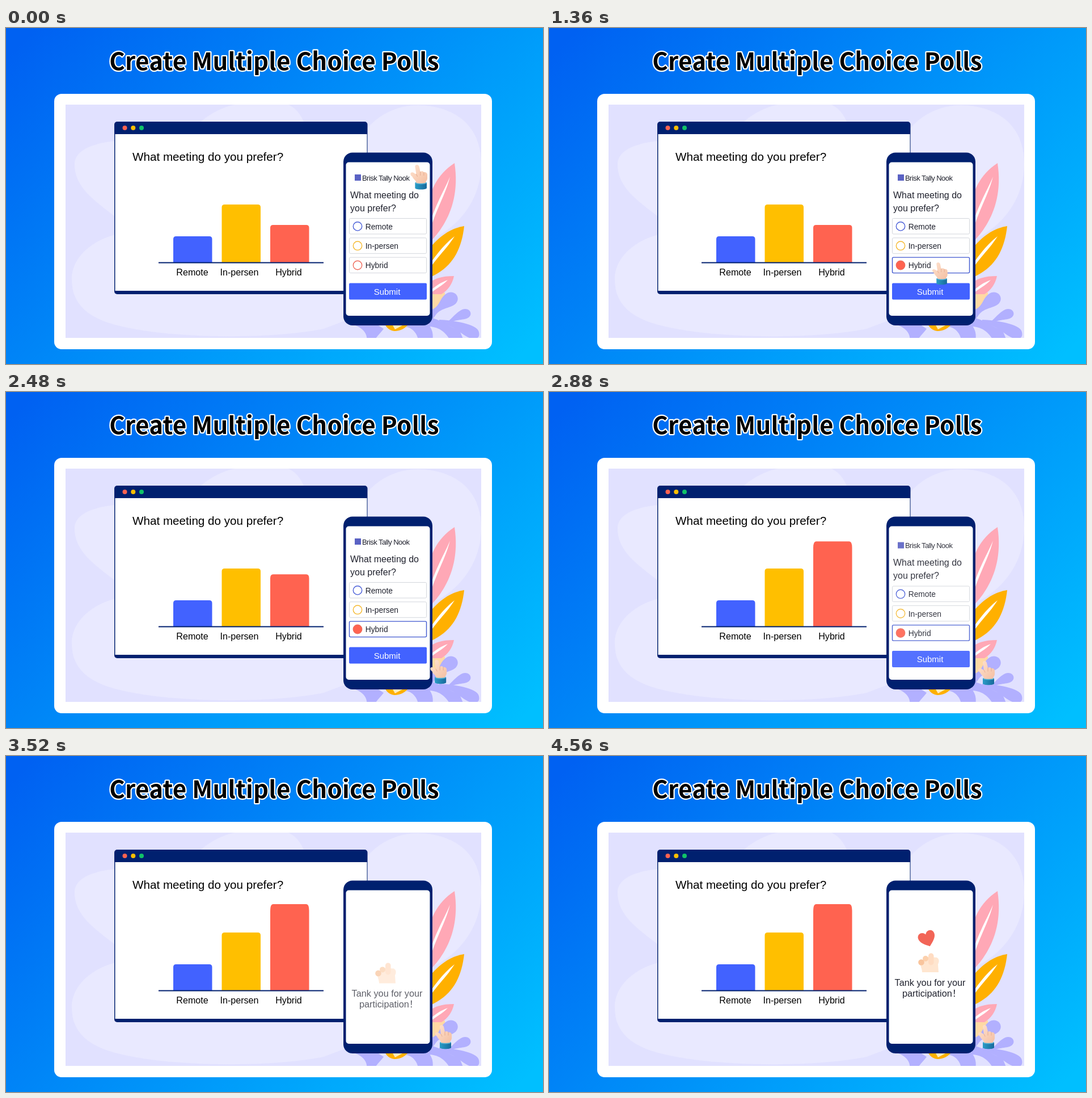
An HTML page that plays this animation: 947x592 px, repeating every 4600 ms.

```html
<!DOCTYPE html>
<html lang="en">
<head>
<meta charset="utf-8">
<title>Multiple choice polls</title>
<style>
  html, body { margin: 0; width: 100%; height: 100%; overflow: hidden; }
  svg { display: block; width: 947px; height: 592px; }
  text { font-family: "Liberation Sans", Arial, sans-serif; }
  .title {
    font: 700 42px "Noto Sans CJK SC", "Noto Sans CJK JP", "Noto Sans", sans-serif;
    letter-spacing: .3px; text-anchor: middle;
    paint-order: stroke; stroke: #fff; stroke-width: 4.5; stroke-linejoin: round;
  }
  .mid { text-anchor: middle; }
  .label { font-size: 16.1px; text-anchor: middle; }
  .phone-text { font-size: 16px; fill: #20222e; }
  .thanks { font-size: 16.3px; fill: #20222e; }
  .option { font-size: 13.8px; fill: #20222e; }
  .vein { fill: #fff; }
</style>
</head>
<body>
<svg viewBox="0 0 947 592">
  <defs>
    <linearGradient id="sky" gradientUnits="userSpaceOnUse" x1="110" y1="-60" x2="837" y2="652">
      <stop offset="0" stop-color="#0061f2"/>
      <stop offset="1" stop-color="#00bfff"/>
    </linearGradient>
    <linearGradient id="skin" x1="0" y1="0" x2="1" y2="1">
      <stop offset="0" stop-color="#ffe3d0"/>
      <stop offset="1" stop-color="#f4bfa2"/>
    </linearGradient>
    <linearGradient id="cuff" x1="0" y1="0" x2="1" y2="0">
      <stop offset="0" stop-color="#2a9cc6"/>
      <stop offset="1" stop-color="#17699b"/>
    </linearGradient>
    <clipPath id="panel"><rect x="105" y="135" width="733" height="411"/></clipPath>
  </defs>

  <rect width="947" height="592" fill="url(#sky)"/>
  <text class="title" x="473" y="74">Create Multiple Choice Polls</text>
  <rect x="85" y="116" width="772" height="450" rx="13" fill="#fff"/>

  <g clip-path="url(#panel)">
    <rect x="105" y="135" width="733" height="411" fill="#e1e1ff"/>
    <g fill="#e9e9ff">
      <path d="M230 197C180 197 121 206 121 241C121 285 165 310 205 342H300V197Z"/>
      <path d="M215 360C160 366 116 400 116 443C116 490 150 514 205 526C290 546 460 550 560 530L640 500V360Z"/>
      <path d="M338 170C360 150 385 135 425 132H490C510 138 520 152 527 170Z"/>
      <path d="M615 215C632 165 680 135 728 136C790 138 838 170 838 240C838 300 800 352 745 374H640Z"/>
    </g>

    <path d="M791 238C766 254 748 280 744 315V381C776 350 801 304 791 238Z" fill="#ffa8b6"/>
    <path class="vein" d="M783 262C774 284 759 308 748 342L751 346C761 316 776 290 783 262Z"/>
    <path d="M808 349C784 353 764 366 744 392V441C785 424 803 394 808 349Z" fill="#ffb000"/>
    <path class="vein" d="M791 367C774 380 760 398 748 415L750 420C762 402 778 388 791 367Z"/>
    <path d="M744 470L774 466C775 480 769 491 744 500Z" fill="#ffd9a4"/>
    <path d="M790 437C771 437 757 440 744 451V469H768C779 462 787 452 790 437Z" fill="#ffa8b6"/>
    <path class="vein" d="M779 444C767 448 757 455 748 463L750 466C760 458 771 453 779 444Z"/>

    <g fill="#b2b0ff">
      <path d="M775 469C787 460 800 470 796 481C791 494 770 491 759 504L748 519V497C765 493 764 477 775 469Z"/>
      <path d="M801 498C810 491 822 497 819 506C814 517 796 511 782 520L771 524C785 514 791 504 801 498Z"/>
      <path d="M764 514C787 515 832 521 834 536C836 546 831 548 820 547C804 542 792 524 764 520Z"/>
      <path d="M745 510C765 512 778 525 800 533L807 550H783C775 535 762 526 745 526Z"/>
      <path d="M704 522H744C752 530 754 540 752 550H727C725 537 716 528 704 526Z"/>
      <path d="M616 521H652L666 530C660 538 654 543 650 550H636C638 540 630 529 616 524Z"/>
    </g>
    <path d="M667 520H712C704 529 696 534 685 534C676 533 671 528 667 520Z" fill="#ffb000"/>
    <path class="vein" d="M681 522L703 522L686 531Z" opacity=".75"/>
  </g>

  <rect x="191" y="165" width="446.500" height="304" rx="5" fill="#00206f"/>
  <rect x="192.500" y="187" width="444" height="276" fill="#fff"/>
  <circle cx="209.500" cy="176" r="4" fill="#ff6350"/>
  <circle cx="224.300" cy="176" r="4" fill="#ffbf00"/>
  <circle cx="239" cy="176" r="4" fill="#10c268"/>
  <text x="223" y="234" font-size="20.650">What meeting do you prefer?</text>
  <g id="chart"></g>
  <path d="M269 413.500H560" stroke="#00206f" stroke-width="1.800"/>

  <rect x="595" y="219.500" width="157" height="304.500" rx="16" fill="#00206f"/>
  <rect x="599.500" y="236.500" width="148" height="270.500" rx="5" fill="#fff"/>

  <g id="form">
    <rect x="615" y="258" width="11" height="11" fill="#5a62c4"/>
    <text x="628" y="268.500" font-size="13" letter-spacing="-.55" fill="#20222e">Brisk Tally Nook</text>
    <text class="phone-text" x="607" y="299.700">What meeting do</text>
    <text class="phone-text" x="607" y="322.500">you prefer?</text>
    <g id="options"></g>
    <rect x="605" y="449.500" width="137" height="29" rx="2" fill="#4262ff"/>
    <text class="mid" x="672" y="469.500" font-size="15" fill="#fff">Submit</text>
  </g>

  <g id="thanks">
    <path d="M658 381C658 374 654 370 655 362L668 354L684 355C689 358 688 363 686 367L687 381Z" fill="#ffe6d0"/>
    <rect id="finger" x="669" width="9.500" height="21" rx="4.700" fill="#ffdcc2"/>
    <circle cx="664" cy="357" r="5" fill="#fcd0ac"/>
    <circle cx="656.500" cy="363.500" r="5.300" fill="#f9c49c"/>
    <text class="thanks mid" x="672" y="405">Tank you for your</text>
    <text class="thanks" x="623" y="424" font-size="16">participation<tspan lang="zh-CN" font-family="'Noto Sans CJK SC', sans-serif">！</tspan></text>
  </g>
  <path id="heart" d="M0 14C-8 8 -15 2 -15 -5C-15 -14 -4 -16 0 -8C4 -16 15 -14 15 -5C15 2 8 8 0 14Z" fill="#f26557"/>

  <g id="hand">
    <path d="M-4 31V40C-2 43 14 43 16 40V31Z" fill="url(#cuff)"/>
    <ellipse cx="6" cy="31" rx="10" ry="2.500" fill="#4fb0d4"/>
    <path d="M-4 3C-4 -1 2 -1 3 3L5 12C8 10 10 11 11 13C14 12 17 14 17 17V23C17 27 14 28 14 31C10 32 1 32 -2 31C-2 27 -7 25 -9 20C-12 18 -13 14 -10 13C-7 12 -4 16 -2 16Z" fill="url(#skin)"/>
    <path d="M5 12V18M11 13V18M-2 16L0 20" fill="none" stroke="#e3a487" stroke-width=".8" stroke-linecap="round"/>
  </g>
</svg>
<script>
const LOOP = 4600, STEP = 40;
const $ = id => document.getElementById(id);

function add(parent, tag, attrs, text) {
  const el = document.createElementNS('http://www.w3.org/2000/svg', tag);
  for (const k in attrs) el.setAttribute(k, attrs[k]);
  if (text) el.textContent = text;
  parent.append(el);
  return el;
}

// name, colour, bar left, bar top, label centre
const choices = [
  ['Remote', '#4262ff', 295, 367, 328.5],
  ['In-persen', '#ffbf00', 380.5, 311, 411.5],
  ['Hybrid', '#ff6350', 466, 347, 498.5]
];
const ringColors = ['#4a5fd8', '#f5b82e', '#ef6b5c'];

const rows = choices.map(([name, color, x, top, mid], i) => {
  const bar = add($('chart'), 'path', {
    d: `M${x} 413V${top + 5}q0 -5 5 -5h58.5q5 0 5 5V413Z`, fill: color
  });
  add($('chart'), 'text', { class: 'label', x: mid, y: 436 }, name);
  const y = 335.5 + i * 34.3;
  const box = add($('options'), 'rect', {
    x: 605.5, y, width: 136, height: 27.5, rx: 2, fill: '#fff', stroke: '#d3d6dc'
  });
  const ring = add($('options'), 'circle', {
    cx: 620, cy: y + 13.9, r: 7.7, fill: '#fff', stroke: ringColors[i], 'stroke-width': 1.4
  });
  add($('options'), 'text', { class: 'option', x: 633.7, y: y + 19.3 }, name);
  return { bar, box, ring };
});
const hybrid = rows[2];

const part = (t, a, b) => Math.min(1, Math.max(0, (t - a) / (b - a)));
const ease = (t, a, b) => (1 - Math.cos(Math.PI * part(t, a, b))) / 2;
const easeOut = (t, a, b) => 1 - (1 - part(t, a, b)) ** 2;
const mix = (a, b, p) => a + (b - a) * p;

// time, x, y, scale
const handPath = [
  [0, 725.5, 241, 1.03],
  [1260, 687, 413, 1],
  [1360, 687, 413, .93],
  [1460, 687, 413, 1],
  [1700, 688, 455, 1],
  [1800, 688, 456, .95],
  [1920, 688, 456, 1],
  [2040, 688, 456, 1],
  [2600, 769, 474, 1]
];

function handAt(t) {
  let i = 0;
  while (i < handPath.length - 2 && t >= handPath[i + 1][0]) i++;
  const a = handPath[i], b = handPath[i + 1], p = ease(t, a[0], b[0]);
  return [1, 2, 3].map(k => mix(a[k], b[k], p));
}

function draw(t) {
  const [x, y, s] = handAt(t);
  $('hand').setAttribute('transform', `translate(${x} ${y}) scale(${s})`);

  const picked = t >= 1360;
  hybrid.ring.setAttribute('fill', picked ? '#ff6350' : '#fff');
  hybrid.box.setAttribute('stroke', picked ? '#3f57cf' : '#d3d6dc');
  hybrid.box.setAttribute('stroke-width', picked ? 1.4 : 1);

  const grow = mix(1, 152 / 66, ease(t, 2200, 2960));
  hybrid.bar.setAttribute('transform', `translate(0 413) scale(1 ${grow}) translate(0 -413)`);

  const out = part(t, 2840, 3255);
  $('form').setAttribute('transform', `translate(0 ${68 * out})`);
  $('form').setAttribute('opacity', 1 - out);

  const shown = easeOut(t, 3340, 3720);
  $('thanks').setAttribute('transform', `translate(0 ${70 * (1 - shown)})`);
  $('thanks').setAttribute('opacity', shown);
  $('finger').setAttribute('y', mix(345, 347.5, ease(t, 3880, 4080)));

  const pop = t < 3880 ? 0 : mix(.06, 1, easeOut(t, 3880, 4320));
  $('heart').setAttribute('transform',
    `translate(${mix(673, 667, pop)} ${mix(343, 322, pop)}) rotate(${-20 * pop}) scale(${pop})`);
  $('heart').setAttribute('visibility', pop ? 'visible' : 'hidden');
}

const start = performance.now();
function tick() {
  const t = (performance.now() - start) % LOOP;
  draw(Math.floor(t / STEP) * STEP);
  requestAnimationFrame(tick);
}
tick();
</script>
</body>
</html>
```
